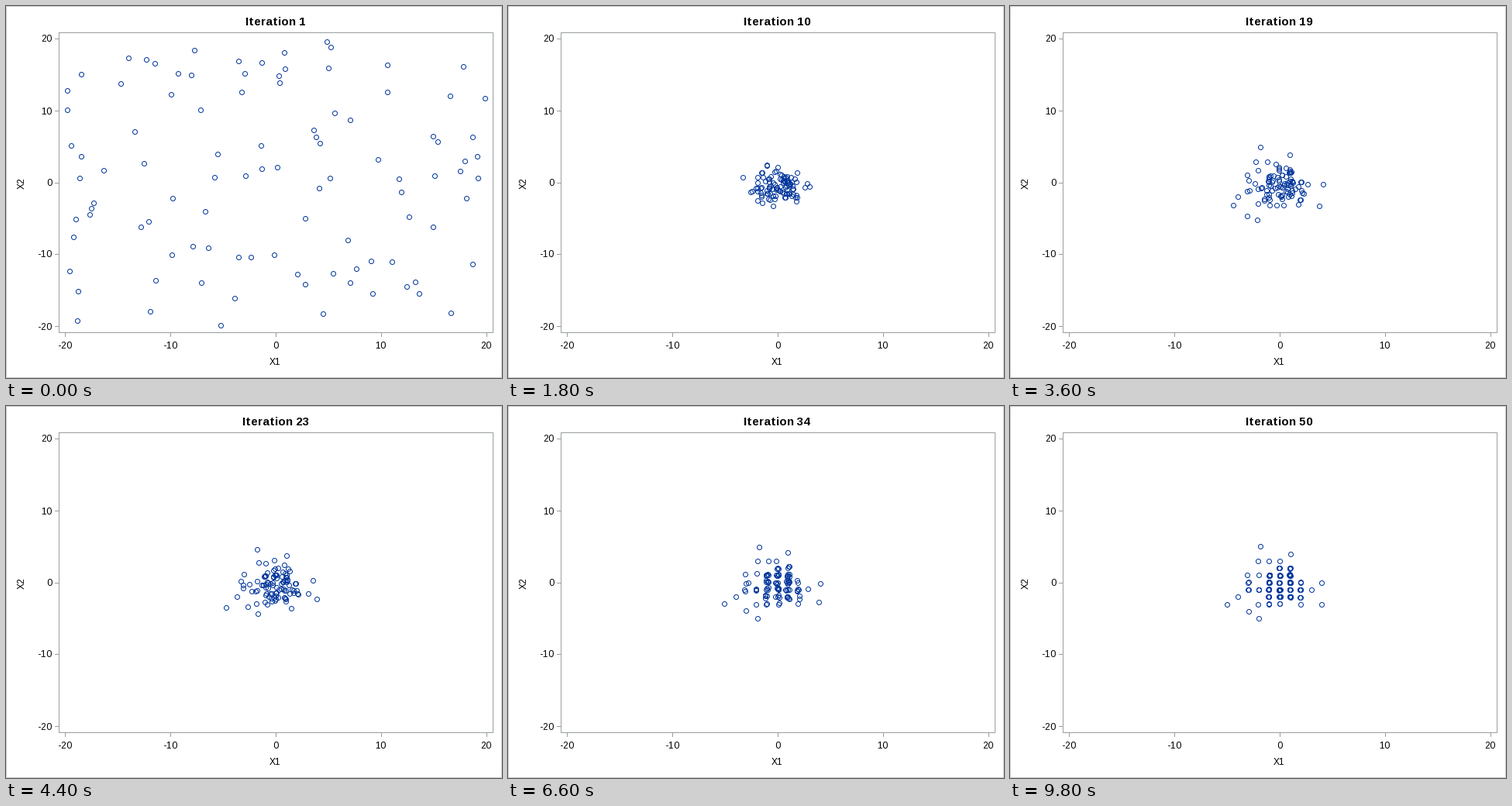
Write a matplotlib script that moves like this. It is 640x480 px and loops after 10 s.

```python
import matplotlib.pyplot as plt
import numpy as np
from matplotlib.animation import FuncAnimation

W, H, DPI = 640, 480, 100
FRAMES, STEP = 50, 200
PX = 72 / DPI
GREY, BLUE = "#989ea1", "#00359b"
COUNT = 100
BEST = np.array([.2, -1])
CENTRE = np.array([.15, -.7])
# Outermost resting places, which give the settled cloud its outline
RIM = [(-5, -3), (-4, -2), (-1.85, 5), (1, 4), (4, 0), (4, -3), (-2, -5),
       (3, -1)]

plt.rcParams["font.family"] = "Liberation Sans"
plt.rcParams["text.hinting_factor"] = 1


def smooth(t):
    t = np.clip(t, 0, 1)
    return t * t * (3 - 2 * t)


def to_px(pts):
    return pts * [13.6, -9.275] + [348, 227.7]


rng = np.random.default_rng(7)
start = rng.uniform(-20, 20, (COUNT, 2))

# Everyone falls towards the best point, but those close to it lag behind
dist = np.hypot(*(start - BEST).T)
left = (.428 + .55 * smooth((11 - dist) / 6))[:, None]

# Particles end in local minima, which sit at whole coordinates
home = .08 * start + rng.normal((.1, -.3), (1, 1.4), (COUNT, 2))
home = np.clip(np.round(home), (-3, -4), (2, 3))
home += rng.normal(0, .04, (COUNT, 2))
home[:len(RIM)] = RIM

phase = rng.uniform(0, 2 * np.pi, (COUNT, 2))
rate = rng.uniform(.5, 1.1, (COUNT, 2))
reach = rng.uniform(.1, 1, (COUNT, 2)) * (.55, .85)


def swarm(n):
    fall = (1 - np.exp(-(n / 5.42) ** 2)) / (1 - .428)
    pulled = BEST + (start - BEST) * (1 - (1 - left) * fall)
    breath = .9725 + .0275 * np.cos(2 * np.pi * (n - 49) / 18)
    wobble = 1 - smooth((n - 25) / 14)
    settled = CENTRE + (home - CENTRE) * breath
    settled = settled + wobble * reach * np.sin(phase + rate * n)
    mix = smooth((n - 5) / 8)
    return pulled * (1 - mix) + settled * mix


fig = plt.figure(figsize=(W / DPI, H / DPI), dpi=DPI, facecolor="white")
ax = fig.add_axes([0, 0, 1, 1])
ax.set_xlim(0, W)
ax.set_ylim(H, 0)
ax.axis("off")


def line(xs, ys, color=GREY):
    ax.plot(np.array(xs) + .5, np.array(ys) + .5, color=color, lw=PX,
            snap=False, solid_capstyle="projecting",
            solid_joinstyle="miter")


def box(x0, y0, x1, y1, color):
    line([x0, x1, x1, x0, x0], [y0, y0, y1, y1, y0], color)


def label(x, y, s, size=12, ha="center", va="baseline", **kw):
    return ax.text(x, y, s, fontsize=size * PX, color="black", ha=ha, va=va,
                   **kw)


box(0, 0, W - 1, H - 1, "#c6c6c6")
box(68, 34, 628, 421, GREY)
for v in range(-20, 21, 10):
    x, y = np.round(to_px(np.array([v, v])))
    line([x, x], [422, 426])
    line([63, 67], [y, y])
    label(x - .5, 441.5, str(v))
    label(59, y + 4.5, str(v), ha="right")
label(347.5, 463, "X1")
label(20.5, 228, "X2", va="center", rotation=90)
title = label(348, 25, "", 14.67, weight="bold")
dots = ax.scatter([], [], s=(6 * PX) ** 2, facecolors="none",
                  edgecolors=BLUE, linewidths=PX)


def draw(n):
    dots.set_offsets(np.round(to_px(swarm(n))) + .5)
    title.set_text(f"Iteration {n + 1}")
    return dots, title


anim = FuncAnimation(fig, draw, frames=FRAMES, interval=STEP,
                     init_func=lambda: draw(0), repeat=True, repeat_delay=0)
plt.show()
```
